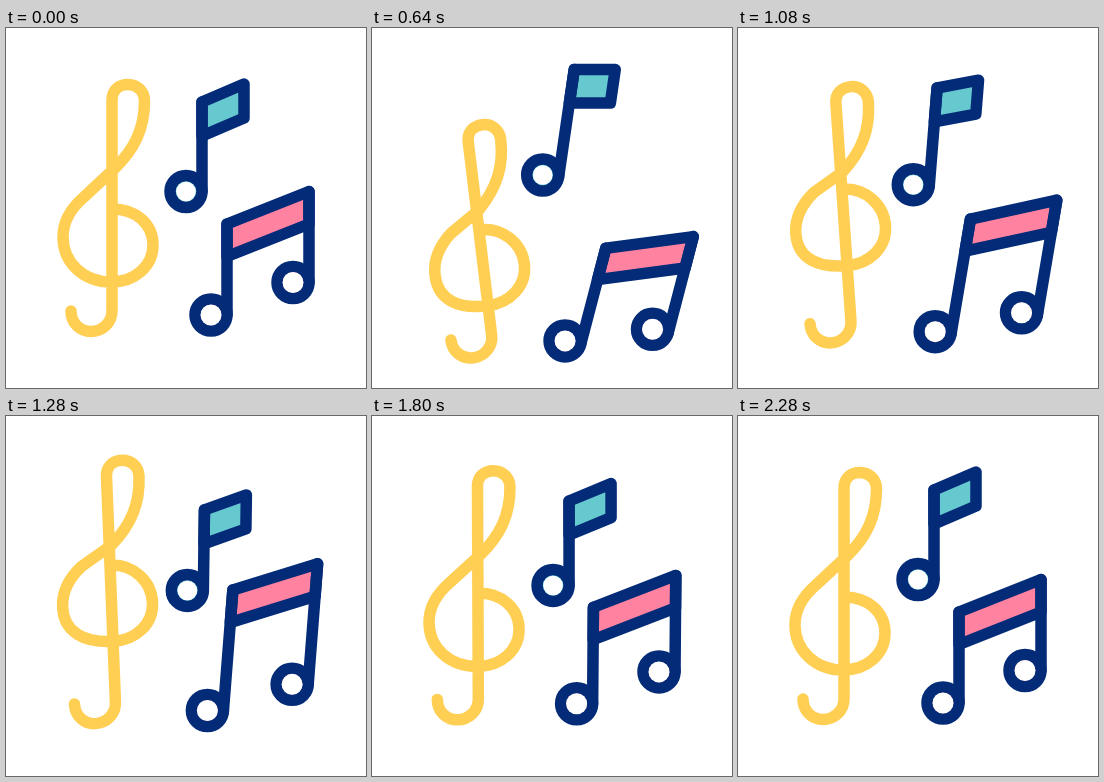
An HTML page for the animation above (2.4 s loop, 360 px wide and 360 px high).

```html
<!DOCTYPE html>
<html lang="en">
<head>
<meta charset="utf-8">
<title>Dancing music notes</title>
<style>
  html, body { margin: 0; height: 100%; overflow: hidden; background: #fff; }
  svg { display: block; width: 100%; height: 100%; }
  path, .ring { stroke-width: 11.5; stroke-linecap: round; stroke-linejoin: round; }
  #clef { fill: none; stroke: #ffcf54; }
  .note { stroke: #032b78; }
  .stem { fill: none; }
  .dot { fill: #fff; stroke: none; }
  #teal { fill: #67c9d0; }
  #pink { fill: #ff82a1; }
</style>
</head>
<body>
<svg viewBox="0 0 360 360">
  <path id="clef"/>
  <g id="teal" class="note"></g>
  <g id="pink" class="note"></g>
</svg>
<script>
const LOOP = 2400, STEP = 40;

// Each part adds two eased pulses to its rest pose: first a sway, then a rebound.
// Pulse times: start, full, hold until, end.
const clefMove = {
  swayTime: [200, 500, 600, 1400],
  reboundTime: [500, 1280, 1280, 1950],
  rest:    { x: 0, lean: 0, top: 0, mid: 0, hook: 0 },
  sway:    { x: 13.5, lean: -6.8, top: 42, mid: 26, hook: 24 },
  rebound: { x: 2.7, lean: -1.9, top: -14, mid: -30, hook: 2 }
};
const tealMove = {
  swayTime: [200, 560, 800, 1400],
  reboundTime: [960, 1480, 1480, 2000],
  rest:    { x: 180, y: 163.5, lean: 0, len: 89.5, dx: 42, dy: -18 },
  sway:    { x: -9.3, y: -16.5, lean: 8.3, len: 19.5, dx: -1, dy: 18 },
  rebound: { x: 3.3, y: 18.5, lean: 0, len: -15.5, dx: 0, dy: 2 }
};
const pinkMove = {
  swayTime: [200, 660, 740, 1450],
  reboundTime: [700, 1300, 1300, 2000],
  rest:    { x: 205, y: 287, lean: 0, len: 91, dx: 82, dy: -32.5 },
  sway:    { x: -12, y: 26, lean: 14.7, len: 9, dx: 5.5, dy: 21 },
  rebound: { x: -2, y: 4, lean: 2.5, len: 30, dx: 2, dy: 3.5 }
};
const flashTime = [200, 400, 400, 600];

function ease(t, from, to) {
  const u = Math.min(1, Math.max(0, (t - from) / (to - from)));
  return (1 - Math.cos(Math.PI * u)) / 2;
}

function pulse(t, [start, full, hold, end]) {
  return ease(t, start, full) - ease(t, hold, end);
}

function pose(move, t) {
  const s = pulse(t, move.swayTime), r = pulse(t, move.reboundTime), out = {};
  for (const k in move.rest) out[k] = move.rest[k] + s * move.sway[k] + r * move.rebound[k];
  return out;
}

function add(parent, tag, cls) {
  const el = document.createElementNS("http://www.w3.org/2000/svg", tag);
  el.setAttribute("class", cls);
  return parent.appendChild(el);
}

function set(el, attrs) {
  for (const name in attrs) el.setAttribute(name, attrs[name]);
}

function makeHead(group) {
  const ring = add(group, "circle", "ring"), dot = add(group, "circle", "dot");
  return (cx, cy, r) => {
    set(ring, { cx, cy, r: 16 });
    set(dot, { cx, cy, r });
  };
}

// The white dot shrinks by `fill` to let the note's colour flash up
function makeNote(id, move, { depth, fill, dot, double }) {
  const group = document.getElementById(id);
  const beam = add(group, "path", "beam"), stem = add(group, "path", "stem");
  const head = makeHead(group), head2 = double && makeHead(group);
  return t => {
    const { x, y, lean, len, dx, dy } = pose(move, t);
    const s = Math.sin(lean * Math.PI / 180), c = Math.cos(lean * Math.PI / 180);
    const bx = x + 16 * c, by = y + 16 * s;
    const tx = bx + len * s, ty = by - len * c;
    set(beam, { d: `M${tx},${ty}l${dx},${dy}l${-depth * s},${depth * c}l${-dx},${-dy}z` });
    let d = `M${tx},${ty}L${bx},${by}`;
    if (double) d += `M${tx + dx},${ty + dy}L${bx + dx},${by + dy}`;
    set(stem, { d });
    head(x, y, dot - fill * pulse(t, flashTime));
    if (double) head2(x + dx, y + dy, 10.5);
  };
}

const clef = document.getElementById("clef");

function drawClef(t) {
  const { x, lean, top, mid, hook } = pose(clefMove, t);
  const at = off => (...p) => p.map((n, i) => i % 2 ? n + off : n).join(" ") + " ";
  const a = at(top), b = at(mid), c = at(hook);
  const side = at((top + mid) / 2), branch = at(mid - 0.2 * (top - mid));
  set(clef, {
    d: "M" + c(65, 283) + "C" + c(65, 295, 74, 303.5, 85, 303.5)
      + "S" + c(106, 295, 106, 283) + "L" + a(106, 72)
      + "C" + a(106, 62, 113, 56.5, 122, 56.5) + "S" + a(138.5, 63, 138.5, 73)
      + "C" + a(138.5, 100, 129, 121, 108, 141) + "L" + side(78, 169)
      + "C" + side(64, 181, 57, 194, 57, 209)
      + "C" + side(57, 235) + b(78, 254, 105, 254)
      + "C" + b(129, 254, 147, 238, 147, 217) + "S" + branch(130, 181, 106, 181),
    transform: `translate(${x}) rotate(${lean} 106 ${283 + hook})`
  });
}

const drawTeal = makeNote("teal", tealMove, { depth: 34, fill: 3.5, dot: 9.8 });
const drawPink = makeNote("pink", pinkMove, { depth: 32.5, fill: 9, dot: 10.5, double: true });
const start = performance.now();

function frame() {
  const now = Math.max(0, performance.now() - start) % LOOP;
  const t = Math.floor((now + 2) / STEP) * STEP % LOOP;
  drawClef(t);
  drawTeal(t);
  drawPink(t);
  requestAnimationFrame(frame);
}
frame();
</script>
</body>
</html>
```
